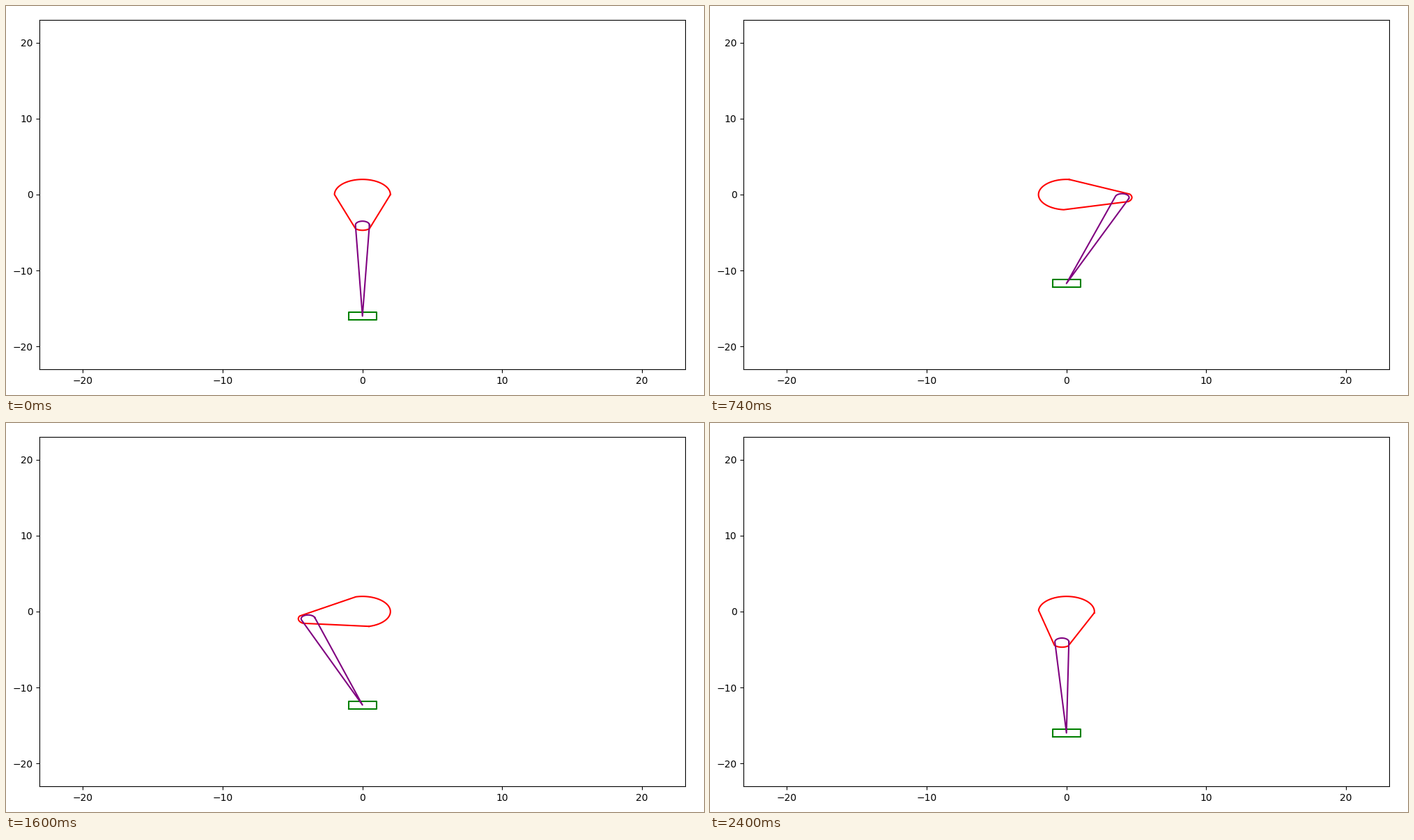
These frames come from a looping animation (1002 by 559 pixels, 2420 ms). A matplotlib script:

```python
import numpy as np
import matplotlib.pyplot as plt
from matplotlib.animation import FuncAnimation

WIDTH, HEIGHT, DPI = 1002, 559, 100
FRAMES, INTERVAL = 121, 20
CRANK, ROD = 4, 12

plt.rcParams["font.family"] = "DejaVu Sans"
fig = plt.figure(figsize=(WIDTH / DPI, HEIGHT / DPI), dpi=DPI)
left, right, top, bottom = 48.2, 975.2, 20, 522
ax = fig.add_axes([left / WIDTH, 1 - bottom / HEIGHT,
                   (right - left) / WIDTH, (bottom - top) / HEIGHT])
ax.set(xlim=(-23.1, 23.1), ylim=(-23, 23))
ax.set_xticks(range(-20, 21, 10))
ax.set_yticks(range(-20, 21, 10))

crank_line, = ax.plot([], [], color="red", lw=1.5)
piston_line, = ax.plot([], [], color="green", lw=1.5)
rod_line, = ax.plot([], [], color="purple", lw=1.5)


def arc(center, radius, start, stop):
    """Points of an arc; angles in radians."""
    a = np.linspace(start, stop, 60)
    return np.column_stack([center[0] + radius * np.cos(a),
                            center[1] + radius * np.sin(a)])


def closed(*parts):
    points = np.vstack(parts)
    return np.vstack([points, points[:1]]).T


def update(i):
    swing = np.pi / 2 * np.sin(2 * np.pi * i / FRAMES)
    pin = CRANK * np.array([np.sin(swing), -np.cos(swing)])
    lean = np.arcsin(pin[0] / ROD)
    piston_y = pin[1] - ROD * np.cos(lean)

    # Counterweight arc joined to a quarter arc around the pin
    down = swing - np.pi / 2
    crank_line.set_data(*closed(
        arc((0, 0), 2, swing, swing + np.pi),
        arc(pin, 0.7, down - np.pi / 4, down + np.pi / 4)))
    rod_line.set_data(*closed(
        arc(pin, 0.5, -lean, np.pi - lean), [[0, piston_y]]))
    piston_line.set_data([-1, 1, 1, -1, -1],
                         piston_y + np.array([-0.5, -0.5, 0.5, 0.5, -0.5]))
    return crank_line, piston_line, rod_line


anim = FuncAnimation(fig, update, frames=FRAMES, interval=INTERVAL,
                     repeat=True, repeat_delay=0, blit=False)
plt.show()
```
